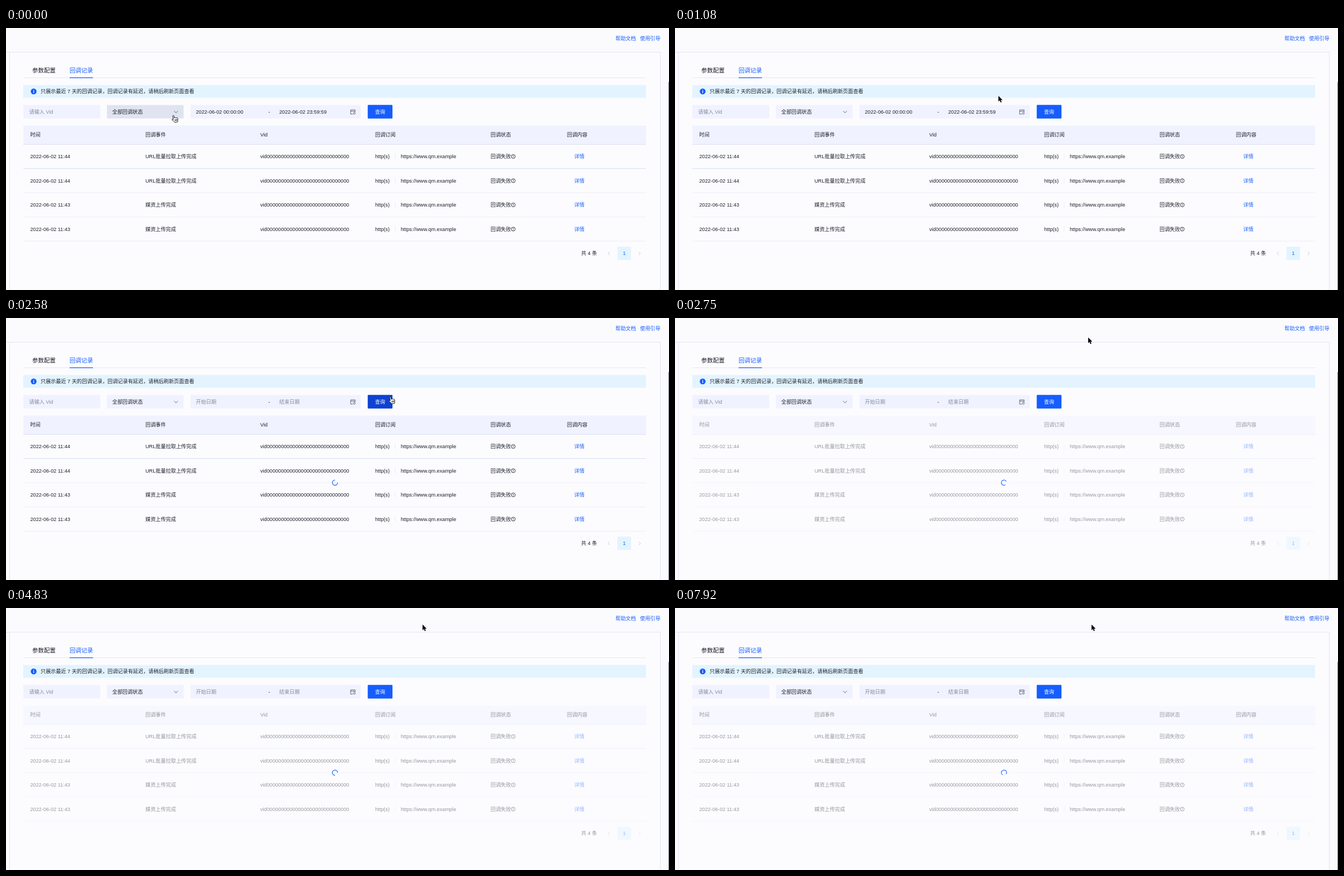
Animation of 1189x471 px, one loop 8000 ms. Source, as an HTML page:

```html
<!DOCTYPE html>
<html lang="zh-CN">
<head>
<meta charset="utf-8">
<style>
html, body { margin: 0; width: 100%; height: 100%; overflow: hidden; background: #fbfbfe; }
svg { display: block; width: 100%; height: 100%; }
text { font: 9.17px "Liberation Sans", "Noto Sans CJK SC", "Noto Sans CJK", sans-serif; fill: #1d2129; white-space: pre; }
.m { font-weight: 500; }
.b { fill: #165dff; }
.p { fill: #858b9c; }
.tab { font-size: 10.5px; }
.line { fill: none; stroke: #4e5564; stroke-width: .9; }
</style>
</head>
<body>
<svg id="stage" viewBox="0 0 1189 471"></svg>
<script>
const FPS = 12, LOOP = 8000;
const FIELD = '#f0f2ff', HOVER = '#dfe4f0', BLUE = '#165dff';

const text = (x, y, s, cls = '') => `<text x="${x}" y="${y}" class="${cls}">${s}</text>`;
const rect = (x, y, w, h, fill, extra = '') =>
  `<rect x="${x}" y="${y}" width="${w}" height="${h}" fill="${fill}" ${extra}/>`;
const path = (d, extra = 'class="line"') => `<path d="${d}" ${extra}/>`;

const columns = [43.5, 250, 456, 662, 869, 1006];
const titles = ['时间', '回调事件', 'Vid', '回调订阅', '回调状态', '回调内容'];

function row(i) {
  const mid = 231 + i * 43.5, y = mid + 3.2;
  return text(43.5, y, '2022-06-02 11:4' + (i < 2 ? 4 : 3)) +
    text(250, y, i < 2 ? 'URL批量拉取上传完成' : '媒资上传完成') +
    text(456, y, 'vid' + '0'.repeat(29)) +
    text(662, y, 'http(s)') +
    rect(697.5, mid - 5, .8, 10, '#e3e5ee') +
    text(708, y, 'https://www.qm.example') +
    text(869, y, '回调失败') +
    `<circle cx="909.7" cy="${mid}" r="3.5" class="line" style="stroke:#1d2129"/>` +
    path(`M909.7 ${mid - 2}v2.4m0 .8v.9`, 'class="line" style="stroke:#1d2129"') +
    text(1019, y, '详情', 'b') +
    rect(31, mid + 21.2, 1117, .9, i ? '#ebecf4' : '#d0def2');
}

const table = `<g id="table">
  ${rect(31, 175.5, 1117, 34, FIELD)}${rect(31, 208.8, 1117, .9, '#dadded')}
  ${titles.map((s, i) => text(columns[i], 195.2, s, 'm')).join('')}
  ${[0, 1, 2, 3].map(row).join('')}
  ${text(1031.5, 408.4, '共 4 条')}
  ${rect(1096.5, 393, 24.5, 24, '#e2f4ff', 'rx="1"')}
  ${text(1106.2, 408.3, '1', 'b')}
  ${path('M1082.6 402.2l-2.8 3 2.8 3M1134.8 402.2l2.8 3-2.8 3', 'fill="none" stroke="#c3c7d2" stroke-width=".9"')}
</g>`;

const menu = `<g id="menu">
  ${rect(181, 166, 137.5, 92, '#fff', 'rx="2" style="filter:drop-shadow(0 2px 5px rgba(0,0,0,.12))"')}
  ${rect(181, 170, 137.5, 28, FIELD)}
  ${['全部回调状态', '回调成功', '回调失败'].map((s, i) => text(190.5, 187.3 + i * 28, s, i ? '' : 'm')).join('')}
</g>`;

stage.innerHTML = `
  ${rect(6.5, 43.5, 1167, 440, '#fcfcff', 'stroke="#dfe3f2" stroke-width=".9"')}
  ${rect(0, 43, 6.5, .9, '#dfe3f2')}
  ${rect(1188, 97, 1, 374, '#777b85')}
  ${text(1093, 22.4, '帮助文档', 'b')}${text(1137, 22.4, '使用引导', 'b')}
  ${text(47, 80.3, '参数配置', 'tab')}${text(114, 80.3, '回调记录', 'tab b m')}
  ${rect(31, 89.2, 1117, .8, '#e2e4ef')}${rect(114, 88.8, 42, 1.3, BLUE)}
  ${rect(31, 102.5, 1117, 23, '#e3f4ff')}
  <circle cx="49.6" cy="114" r="5.2" fill="${BLUE}"/>
  ${rect(49, 111, 1.2, 1.3, '#fff')}${rect(49, 113, 1.2, 4, '#fff')}
  ${text(62, 117.2, '只展示最近 7 天的回调记录，回调记录有延迟，请稍后刷新页面查看')}
  ${rect(31, 138.5, 138, 24, FIELD)}${text(41.5, 153.7, '请输入 Vid', 'p')}
  ${rect(181, 138.5, 137.5, 24, FIELD, 'id="select"')}${text(190.5, 153.7, '全部回调状态')}
  ${path('M301.5 149.2l3.4 3.3 3.4-3.3')}
  ${rect(331, 138.5, 305, 24, FIELD, 'id="range"')}
  ${text(470.5, 153.7, '-')}
  <g id="dates">${text(340.5, 153.5, '2022-06-02 00:00:00')}${text(490, 153.5, '2022-06-02 23:59:59')}</g>
  <g id="hints">${text(340.5, 153.7, '开始日期', 'p')}${text(490, 153.7, '结束日期', 'p')}</g>
  <g id="calendar">${path('M622 154.8h-3.9v-7.6h8v3.6M618 149.6h8')}
    <circle cx="624.7" cy="153.2" r="1.7" class="line"/></g>
  ${path('M619.2 148.2l5.6 5.6m0-5.6l-5.6 5.6', 'id="clear" class="line"')}
  ${rect(648.7, 138.3, 44.4, 24.4, BLUE, 'rx="1.3" id="button"')}
  <text x="661.7" y="153.8" style="fill:#fff">查询</text>
  ${table}${menu}
  ${path('M594.7 296a4.7 4.7 0 1 1-4.7-4.7', `id="spinner" fill="none" stroke="${BLUE}" stroke-width="1.2"`)}
  ${path('M0 0v10.3l2.4-2.2 1.6 3.8 1.8-.8-1.6-3.6h3.2z', 'id="arrow" stroke="#fff" stroke-width=".9" paint-order="stroke"')}
  ${path('M-1.1 7V.9a1.1 1.1 0 0 1 2.2 0v3.7a1.1 1 0 0 1 2.1.2a1.1 1 0 0 1 2 .5a1 1 0 0 1 1.7.8v2.4c0 1.5-1 2-1.1 4H.4c-.4-2-2.9-3.9-3.8-5.4c-.5-1 .7-1.7 1.4-1zM1.6 7.2v3M3.4 7.2v3M5.1 7.2v3',
    'id="hand" fill="#fff" stroke="#111" stroke-width=".9"')}`;

// Cursor stops: step, x, y
const stops = [
  [0, 300, 157.5], [7, 300, 157.5], [8, 330, 135], [9, 400, 100], [10, 480, 80], [11, 527, 75],
  [13, 580, 122], [14, 596, 139], [16, 612, 150], [18, 617, 152], [26, 617, 152], [27, 660, 148],
  [28, 689, 142], [31, 689, 142], [32, 714, 20], [33, 741, 35], [39, 747, 29.7], [96, 747, 29.7]
];

function cursorAt(n) {
  const i = Math.max(1, stops.findIndex(s => s[0] >= n));
  const [a, b] = [stops[i - 1], stops[i]], k = (n - a[0]) / (b[0] - a[0]);
  return [a[1] + (b[1] - a[1]) * k, a[2] + (b[2] - a[2]) * k];
}

const el = id => document.getElementById(id);
const show = (id, on) => el(id).style.opacity = +on;
const fill = (id, color) => el(id).setAttribute('fill', color);
const within = (n, a, b) => n >= a && n < b;
const clamp = v => Math.min(1, Math.max(0, v));

function draw(now) {
  const n = Math.floor((now % LOOP) * FPS / 1000 + .06);
  const [x, y] = cursorAt(n);
  const hand = n < 8 || within(n, 21, 32);
  const hoverRange = within(n, 14, 27);

  fill('select', n < 8 ? HOVER : FIELD);
  fill('range', hoverRange ? HOVER : FIELD);
  fill('button', within(n, 27, 30) ? '#4080ff' : within(n, 30, 32) ? '#0e42d2' : BLUE);
  show('menu', clamp(Math.min((n - 1) / 2, (8 - n) / 2)));
  show('dates', n < 23);
  show('hints', n >= 23);
  show('clear', hoverRange && n < 23);
  show('calendar', !(hoverRange && n < 23));
  show('table', 1 - .55 * clamp((n - 31) / 2));
  show('spinner', n >= 30);
  el('spinner').setAttribute('transform', `rotate(${(n - 31) * 30} 590 296)`);
  show('hand', hand);
  show('arrow', !hand);
  el('hand').setAttribute('transform', `translate(${x} ${y}) rotate(-10)`);
  el('arrow').setAttribute('transform', `translate(${x} ${y})`);
}

const start = performance.now();
function tick() {
  draw(performance.now() - start);
  requestAnimationFrame(tick);
}
tick();
</script>
</body>
</html>
```
